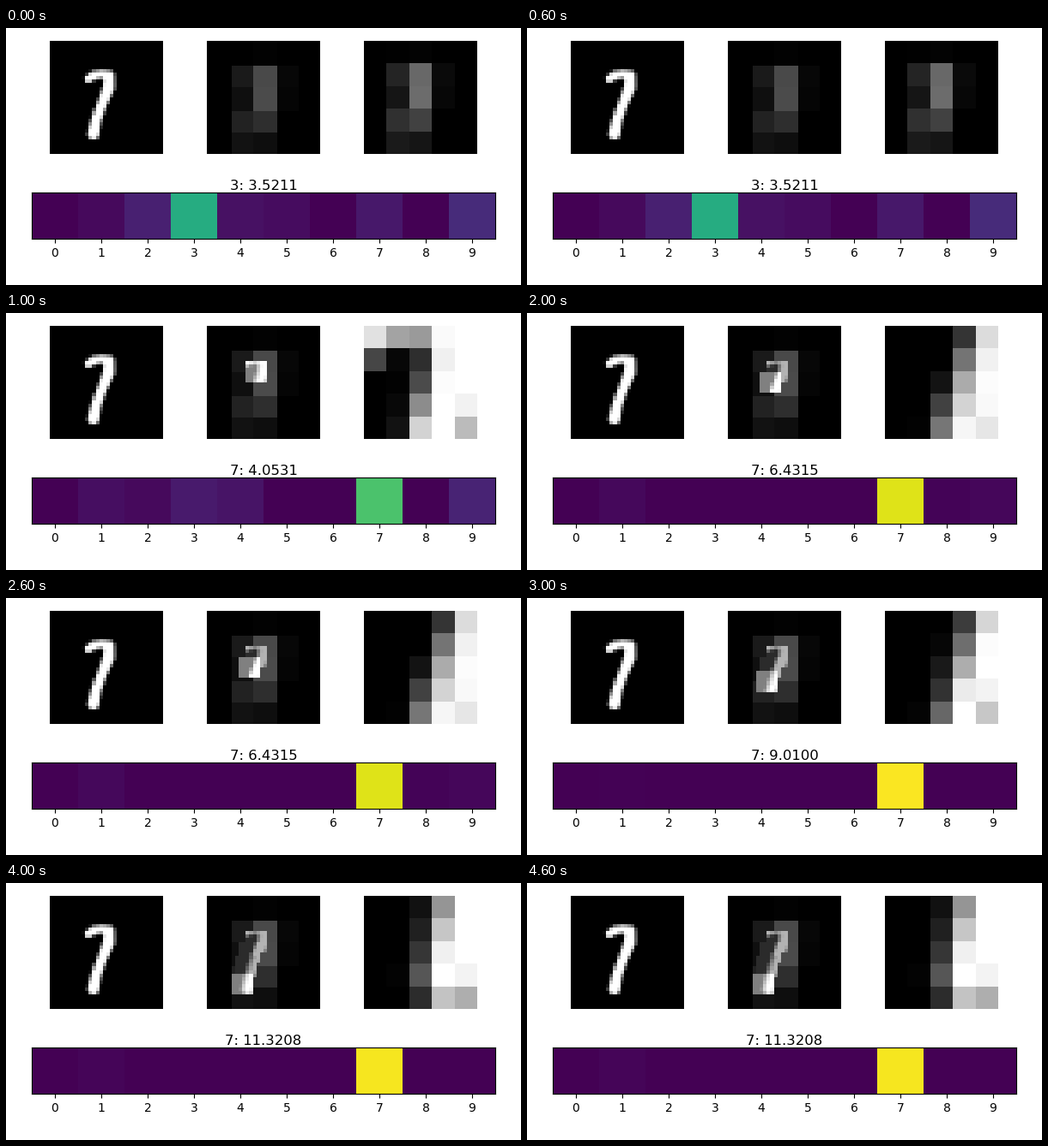
A matplotlib script for the animation above (5000 ms loop, 600x300 px).

```python
import numpy as np
import matplotlib.pyplot as plt
from matplotlib.animation import FuncAnimation

W, H, DPI = 600, 300, 100
SIZE, CELLS, PATCH = 32, 5, 6
DRIFT = 0.6  # the sensor looks slightly right of where its patch is pasted

plt.rcParams["font.family"] = "DejaVu Sans"


def draw_digit(path):
    """Soft stroke along (x, y, radius) points, on a SIZE x SIZE grid."""
    y, x = np.mgrid[:SIZE, :SIZE] + 0.5
    ink = np.zeros((SIZE, SIZE))
    for (x0, y0, r0), (x1, y1, r1) in zip(path, path[1:]):
        dx, dy = x1 - x0, y1 - y0
        t = np.clip(((x - x0) * dx + (y - y0) * dy) / (dx**2 + dy**2), 0, 1)
        dist = np.hypot(x - x0 - t * dx, y - y0 - t * dy)
        ink = np.maximum(ink, np.clip(r0 + t * (r1 - r0) + 0.5 - dist, 0, 1))
    return ink


def tent(start, length, n):
    """Weights that resample one axis to n cells with a triangle filter."""
    step = length / n
    centres = start + step * (np.arange(n) + 0.5)
    offset = np.abs(np.arange(SIZE) + 0.5 - centres[:, None])
    w = np.clip(1 - offset / step, 0, None)
    return w / w.sum(axis=1, keepdims=True)


def look(x, y, length, n):
    return tent(y, length, n) @ digit @ tent(x, length, n).T


digit = draw_digit([(11, 10.9, 1.1), (12.5, 9.7, 1.15), (14.8, 9.4, 1.15),
                    (16.8, 10, 1.55), (16.7, 13, 1.7), (15.7, 15.5, 1.55),
                    (14.6, 18.2, 1.4), (13.1, 22.4, 1.35), (12.3, 26.4, 1.55)])
overview = look(0, 0, SIZE, CELLS)
spots = [(11, 10), (9.4, 13), (8, 17), (7, 22)]

# winning class, its probability, score, and rival classes by rank
results = [(3, 0.62, 3.5211, (9, 2, 7, 4, 5, 1)),
           (7, 0.715, 4.0531, (9, 3, 4, 1, 2)),
           (7, 0.95, 6.4315, (1, 9, 8)),
           (7, 0.995, 9.0100, (1,)),
           (7, 0.985, 11.3208, (1,))]


def glimpse_at(step):
    if step == 0:
        return overview
    x, y = spots[step - 1]
    return look(x + DRIFT, y, PATCH, CELLS)


def canvas_at(step):
    """Dimmed overview with visited patches; the newest is highlighted."""
    idx = np.arange(SIZE) * CELLS // SIZE
    canvas = 0.7 * overview[np.ix_(idx, idx)]
    for k, (x, y) in enumerate(spots[:step], 1):
        patch = look(x + DRIFT, y, PATCH, PATCH)
        lit = 0.5 + 0.5 * patch if k == step else 0.17 + 0.53 * patch
        col = int(x)
        canvas[y:y + PATCH, col:col + PATCH] = lit
    return canvas


def probs_at(step):
    """Rivals share what the winner leaves, in a falling geometric series."""
    label, conf, _, rivals = results[step]
    share = 0.72 ** np.arange(len(rivals))
    p = np.zeros((1, 10))
    p[0, label] = conf
    p[0, list(rivals)] = (1 - conf) * share / share.sum()
    return p


fig = plt.figure(figsize=(W / DPI, H / DPI), dpi=DPI, facecolor="white")


def add_image(x, y, w, h, data, cmap):
    ax = fig.add_axes([x / W, 1 - (y + h) / H, w / W, h / H])
    im = ax.imshow(data, cmap=cmap, vmin=0, vmax=1, aspect="auto",
                   interpolation="nearest")
    return ax, im


panels = []
for left, data in zip((51, 234, 417), (digit, canvas_at(0), overview)):
    ax, im = add_image(left, 15, 131.9, 131.9, data, "gray")
    ax.axis("off")
    panels.append(im)

bar_ax, bar = add_image(29.995, 192, 540, 54, probs_at(0), "viridis")
bar_ax.set_xticks(range(10))
bar_ax.set_yticks([])
title = bar_ax.set_title("", fontsize=11.85, pad=1.3)


def update(step):
    panels[1].set_data(canvas_at(step))
    panels[2].set_data(glimpse_at(step))
    bar.set_data(probs_at(step))
    label, _, score, _ = results[step]
    title.set_text(f"{label}: {score:.4f}")
    return panels[1], panels[2], bar, title


anim = FuncAnimation(fig, update, frames=len(results), interval=1000,
                     repeat=True, repeat_delay=0, blit=False)
plt.show()
```
